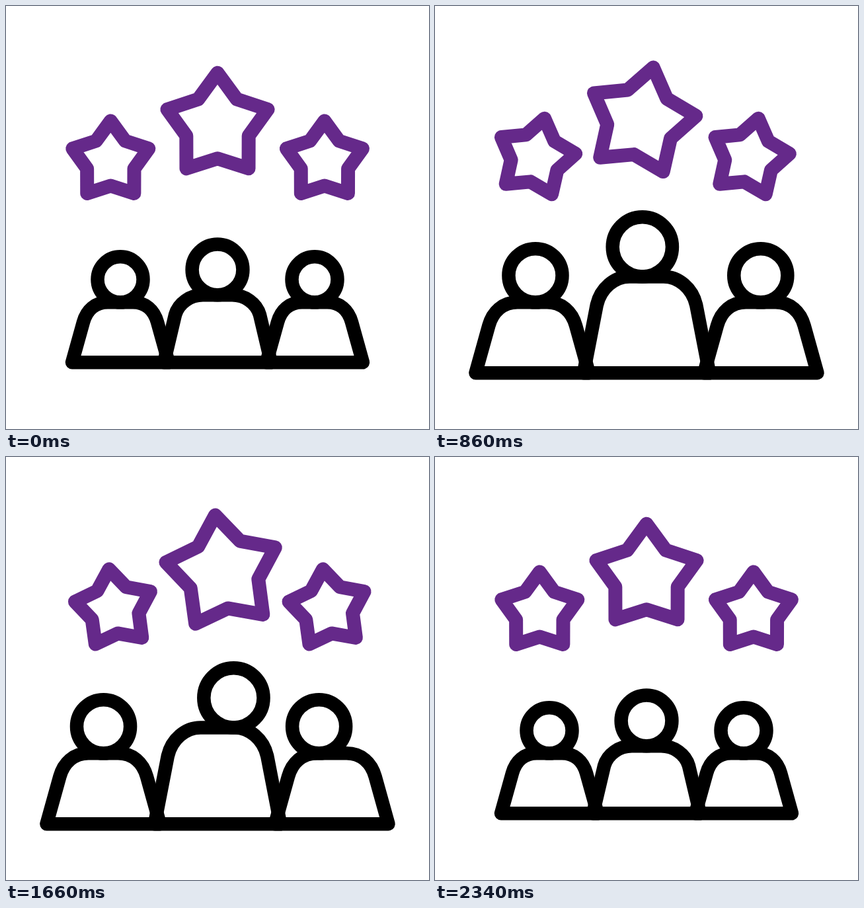
Write an HTML page with a canvas that moves like this. It is 640 px wide and 640 px high and loops after 2400 ms.

```html
<!DOCTYPE html>
<html lang="en">
<head>
<meta charset="utf-8">
<title>Three people and three stars</title>
<style>
  html, body { margin: 0; width: 100%; height: 100%; overflow: hidden; background: #fff; }
  canvas { display: block; }
</style>
</head>
<body>
<canvas id="stage" width="640" height="640"></canvas>
<script>
const ctx = document.getElementById('stage').getContext('2d');
const LOOP = 2400, PURPLE = '#65298a', BLACK = '#000';

// Eased progress 0..1 between two times
function ease(t, from, to) {
  const p = Math.min(1, Math.max(0, (t - from) / (to - from)));
  return p * p * (3 - 2 * p);
}

const mix = (a, b, p) => a + (b - a) * p;

function stroke(color, width) {
  ctx.strokeStyle = color;
  ctx.lineWidth = width;
  ctx.stroke();
}

// Turns about the middle of its bounding box, which lies above its centre
function star(x, y, radius, angle) {
  ctx.save();
  ctx.translate(x, y);
  ctx.rotate(angle);
  ctx.beginPath();
  for (let i = 0; i < 10; i++) {
    const r = i % 2 ? radius * 0.62 : radius;
    const a = i * Math.PI / 5;
    ctx.lineTo(r * Math.sin(a), radius * 0.0955 - r * Math.cos(a));
  }
  ctx.closePath();
  stroke(PURPLE, 21);
  ctx.restore();
}

// Four diagonal dashes that shoot outwards; the lower pair sits closer together
function sparks(t) {
  const near = 88 + 34 * ease(t, 1900, 2300);
  const far = 88 + 34 * ease(t, 1800, 2130);
  if (far - near < 0.1) return;
  ctx.beginPath();
  for (const sx of [-1, 1]) {
    for (const sy of [-1, 1]) {
      const inset = sy > 0 ? 40 : 0;
      ctx.moveTo(319.7 + sx * (near - inset), 204.5 + sy * (near - 13.5));
      ctx.lineTo(319.7 + sx * (far - inset), 204.5 + sy * (far - 13.5));
    }
  }
  ctx.translate(inset0, 0);
  stroke(PURPLE, 21);
}
const inset0 = 0;

// base, shoulder and flat are half widths; (x, y) is the middle of the shoulder line
function person(x, y, kx, ky, shape, headShift) {
  const { base, height, shoulder, flat, head } = shape;
  ctx.save();
  ctx.translate(x, y);
  ctx.beginPath();
  ctx.save();
  ctx.scale(kx, ky);
  ctx.moveTo(-base, height);
  ctx.lineTo(-shoulder, 30);
  ctx.bezierCurveTo(5 - shoulder, 12, -flat - 19, 0, -flat, 0);
  ctx.lineTo(flat, 0);
  ctx.bezierCurveTo(flat + 19, 0, shoulder - 5, 12, shoulder, 30);
  ctx.lineTo(base, height);
  ctx.closePath();
  ctx.restore();
  stroke(BLACK, 20.5);

  const r = head * kx;
  ctx.beginPath();
  ctx.arc(headShift, -r, r, 0, 2 * Math.PI);
  stroke(BLACK, 20.5);
  ctx.restore();
}

const SIDE = { base: 73, height: 91, shoulder: 56, flat: 19, head: 34.5 };
const MIDDLE = { base: 81, height: 102, shoulder: 64, flat: 22, head: 38.4 };

function draw(t) {
  ctx.fillStyle = '#fff';
  ctx.fillRect(0, 0, 640, 640);
  ctx.lineCap = ctx.lineJoin = 'round';

  const angle = 2 * Math.PI * ease(t, 200, 2300);
  const swell = 1 + 0.097 * (ease(t, 200, 1700) - ease(t, 1800, 2340));
  star(158.3, 228.7, 60.5, angle);
  star(481.9, 228.7, 60.5, angle);
  star(320, 173.5, 80 * swell, angle);
  sparks(t);

  const lookLeft = ease(t, 700, 1200) - ease(t, 1200, 1700);
  const back = ease(t, 1700, 2200);
  const lookRight = ease(t, 1200, 1700) - back;
  const grow = ease(t, 200, 700) - back;
  const k = mix(1, 1.175, grow);
  const leftX = mix(173, 147.2, grow);
  person(leftX, 448.3, k, k, SIDE, 19.5 * lookLeft);
  person(640 - leftX, 448.3, k, k, SIDE, -19.5 * lookRight);
  person(320, mix(437.3, 409.5, grow), k, mix(1, 1.43, grow), MIDDLE, 25.3 * (lookRight - lookLeft));
}

function tick() {
  draw(performance.now() % LOOP);
  requestAnimationFrame(tick);
}
tick();
</script>
</body>
</html>
```
